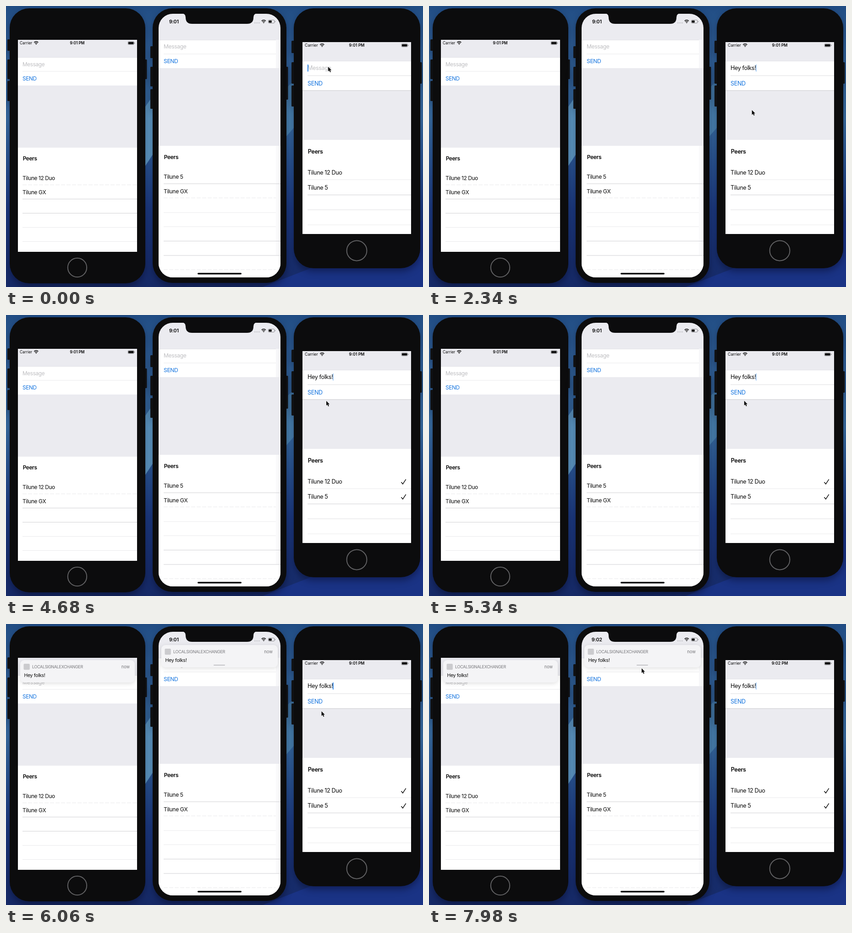
Write an HTML page that moves like this. It is 910 by 615 pixels and loops after 8 s.

```html
<!DOCTYPE html>
<html lang="en">
<head>
<meta charset="utf-8">
<title>Peer messages</title>
<style>
  html, body { margin: 0; width: 100%; height: 100%; overflow: hidden; background: #1d3d82; }
  svg { display: block; width: 910px; height: 615px; }
  text { font-family: Inter, "Liberation Sans", sans-serif; letter-spacing: -.03em; white-space: pre; }
  .body { filter: drop-shadow(0 7px 8px rgba(0, 0, 20, .4)); }
  .banner { filter: drop-shadow(0 2px 5px rgba(0, 0, 0, .13)); }
</style>
</head>
<body>
<svg id="stage" viewBox="0 0 910 615" xmlns="http://www.w3.org/2000/svg"></svg>
<script>
const LOOP = 8000;
const GREY = '#ebebf0', BLUE = '#1273df', FAINT = '#e9e9eb', RULE = '#d0d0d3';
const DEVICE = { pro: 'Tilune 12 Duo', small: 'Tilune GX', eight: 'Tilune 5' };
const APP = 'LOCALSIGNALEXCHANGER';
const MESSAGE = 'Hey folks!';
const KEYS = [780, 840, 900, 960, 1020, 1080, 1320, 1440, 1860, 1980];

const phones = [
  {
    body: [8, 5, 296, 602], screen: [26, 74, 260, 464], corner: 0, size: 11.8,
    left: [[73, 25], [117, 43], [164, 44]], right: [117, 43],
    field: [112, 174], split: 143, list: 310, textX: 36, ruleEnd: 286,
    base: [131.5, 163, 338, 381, 412],
    peers: [DEVICE.pro, DEVICE.small],
    rules: [[391.5, FAINT, 1], [422.5, RULE], [453.5, RULE], [484.5, FAINT], [515.5, FAINT]],
    home: [155.5, 572.5, 20.7]
  },
  {
    body: [320, 5, 292, 601], screen: [333, 17, 266, 577], corner: 31, size: 12.1,
    left: [[88, 26], [133, 43], [182, 43]], right: [133, 72],
    field: [74, 136], split: 105, list: 306, textX: 344, ruleEnd: 589,
    base: [93.3, 125.2, 335, 378, 409.5],
    peers: [DEVICE.eight, DEVICE.small],
    rules: [[389, RULE], [420, FAINT, 1], [452, FAINT], [483, FAINT], [514.5, RULE], [546, RULE], [577, FAINT, 1]]
  },
  {
    body: [628, 5, 276, 569], screen: [647, 79, 237, 420], corner: 0, size: 12.6,
    left: [[76, 27], [123, 47], [174, 46]], right: [123, 47],
    field: [120, 185], split: 152.5, list: 293, textX: 658, ruleEnd: 884,
    base: [140, 173.5, 323.3, 369, 402],
    peers: [DEVICE.pro, DEVICE.eight],
    rules: [[380, FAINT], [413.5, RULE], [446, '#dedee1'], [479, FAINT]],
    home: [765.5, 535.5, 21.9]
  }
];

const rect = (x, y, w, h, fill, r = 0, extra = '') =>
  `<rect x="${x}" y="${y}" width="${w}" height="${h}" rx="${r}" fill="${fill}" ${extra}/>`;
const text = (x, y, size, str, fill = '#080808', extra = '') =>
  `<text x="${x}" y="${y}" font-size="${size}" fill="${fill}" ${extra}>${str}</text>`;
const rule = (x1, x2, y, color, dashed) =>
  `<path d="M${x1} ${y}H${x2}" stroke="${color}" ${dashed ? 'stroke-dasharray="9 3"' : ''}/>`;

const wifi = (x, y) => `<g transform="translate(${x} ${y})" fill="none" stroke="#080808" stroke-width="1.5">
  <path d="M-4.6 -1.3A6.6 6.6 0 0 1 4.6 -1.3M-2.8 .8A4 4 0 0 1 2.8 .8"/>
  <path d="M-1.5 2.2L0 3.8L1.5 2.2Q0 1 -1.5 2.2Z" fill="#080808" stroke="none"/></g>`;

const battery = (x, y, level) =>
  rect(x, y - 3.3, 13.4, 6.8, 'none', 1.8, 'stroke="#77777a" stroke-width=".8"') +
  rect(x + 1, y - 2.3, 11.4 * level, 4.8, '#080808', 1) +
  rect(x + 14.2, y - 1, 1, 2.2, '#77777a', .5);

const statusBar = (x, mid, y, barX, size, id) => `<g id="${id}">` +
  text(x, y + 3, size, 'Carrier', '#080808', 'style="letter-spacing:0"') + wifi(x + 35.8 + (size - 8.3) * 4, y) +
  text(mid, y + 3, size, '', '#080808', 'class="clock" data-suffix=" PM" font-weight="600" text-anchor="middle" style="letter-spacing:0"') +
  battery(barX, y, 1) + '</g>';

// Drawn at its resting place relative to its own top left corner.
const banner = (id, w, scale, grabber) => `<g id="${id}" class="banner">` +
  rect(0, 0, w, 49, '#f4f4f6', 9) +
  rect(7.5, 8, 13.3, 13.3, '#cbcbce', 2) +
  text(26, 18, 8.9 * scale, APP, '#77777b') +
  text(w - 11, 18, 9.2 * scale, 'now', '#77777b', 'text-anchor="end" style="letter-spacing:0"') +
  text(8.4, 37.4, 10.5 * scale, MESSAGE) +
  (grabber ? rect(w / 2 - 13, 43, 25, 2, '#c3c3c7', 1) : '') + '</g>';

function phone(p, i) {
  const [bx, by, bw, bh] = p.body, [sx, sy, sw, sh] = p.screen, [top, bottom] = p.field;
  const whiteEnd = p.corner ? p.ruleEnd : sx + sw;
  const button = (x, [y, h]) => rect(x, y, 8, h, '#101113', 1.5);
  const [msgY, sendY, peersY, ...rowY] = p.base;
  let s = '<g class="body">' + p.left.map(b => button(bx - 5, b)).join('') +
    button(bx + bw - 4.5, p.right) + rect(bx, by, bw, bh, '#0c0c0d', 43) + '</g>';
  s += `<clipPath id="clip${i}">${rect(sx, sy, sw, sh, '#fff', p.corner)}</clipPath><g clip-path="url(#clip${i})">`;
  s += rect(sx, sy, sw, sh, GREY) +
    rect(sx, top, sw, bottom - top, '#f7f7f9') +
    rect(sx, top, whiteEnd - sx, bottom - top, '#fff') +
    rect(sx, p.list, sw, 400, '#fff');
  if (p.corner) s += rect(whiteEnd, p.list, 10, 240, '#fafafb');
  s += rule(sx, whiteEnd, top + .5, '#e2e2e6') + rule(p.textX, p.ruleEnd, p.split, i == 2 ? '#dedee1' : FAINT);
  if (i == 2) s += rule(sx, sx + sw, bottom, '#c9c9cd');
  s += text(p.textX, msgY, p.size, 'Message', '#bfbfc2', `id="hint${i}"`) +
    text(p.textX, sendY, p.size, 'SEND', BLUE) +
    text(p.textX + .7, peersY, p.size, 'Peers', '#080808', 'font-weight="600"') +
    p.peers.map((name, n) => text(p.textX, rowY[n], p.size, name)).join('') +
    p.rules.map(([y, c, dash]) => rule(p.textX, c == RULE ? sx + sw : p.ruleEnd, y, c, dash)).join('');
  if (i == 0) s += statusBar(30, 155.5, 81, 266, 8.3, 'status0') + banner('banner0', 250, 1, false);
  if (i == 1) s += text(366.3, 37.7, 10.8, '', '#080808', 'class="clock" data-suffix="" font-weight="600" text-anchor="middle"') +
    [543, 546.3, 549.6, 552.9].map(x => `<circle cx="${x}" cy="37" r=".8" fill="#8a8a8e"/>`).join('') +
    wifi(562.3, 34) + battery(572.5, 34, .55) + banner('banner1', 254, 1.02, true);
  if (i == 2) s += statusBar(652, 765.5, 86, 863, 8.8, 'status2') +
    text(p.textX, msgY, p.size, '', '#080808', 'id="typed"') +
    rect(0, 128, 1.7, 15.5, '#1478e8', .6, 'id="caret"') +
    [0, 33].map((dy, n) => `<path id="check${n}" d="M862.5 ${365.8 + dy}l3.4 4.2l6.8 -10.4" fill="none" stroke="#080808" stroke-width="1.4"/>`).join('');
  s += '</g>';
  if (i == 1) s += '<path d="M384 16Q392 17 392 25Q392 39 406 39H526Q540 39 540 25Q540 17 548 16Z" fill="#0c0c0d"/>' +
    rect(418, 584, 96, 3.6, '#080808', 1.8);
  if (p.home) s += `<circle cx="${p.home[0]}" cy="${p.home[1]}" r="${p.home[2]}" fill="none" stroke="#616163" stroke-width="2"/>`;
  return s;
}

const stops = [[0, '#214c83'], [.15, '#306199'], [.4, '#3a70a5'], [.56, '#2a5594'], [.72, '#1d3b82'], [1, '#162966']];
const stage = document.getElementById('stage');
stage.innerHTML =
  `<linearGradient id="sky" x2="0" y2="1">${stops.map(([o, c]) => `<stop offset="${o}" stop-color="${c}"/>`).join('')}</linearGradient>` +
  rect(0, 0, 910, 615, 'url(#sky)') +
  '<path d="M296 362L325 318V190L296 232Z" fill="#609cc8"/>' +
  '<path d="M606 292L632 262V160L606 185Z" fill="#4a84b3"/>' +
  '<path d="M560 615L700 560L910 470V615Z" fill="#1a3385"/>' +
  phones.map(phone).join('') +
  '<path id="pointer" d="M0 0V10.3L2.4 8.1L4.1 12L5.9 11.2L4.2 7.4H7.3Z" fill="#080808" stroke="#fff" stroke-width=".9" paint-order="stroke"/>';

const el = id => document.getElementById(id);
const clocks = [...document.querySelectorAll('.clock')];
const show = (id, on) => el(id).setAttribute('visibility', on ? 'visible' : 'hidden');
const move = (id, x, y) => el(id).setAttribute('transform', `translate(${x} ${y})`);
const clamp = v => Math.max(0, Math.min(1, v));
const smooth = v => v * v * (3 - 2 * v);

// time, x, y of the pointer tip
const path = [
  [0, 703, 133], [2100, 703, 133], [2640, 707, 359], [3540, 707, 359], [3900, 705, 392],
  [4320, 705, 392], [4680, 699, 188], [4860, 684, 170], [5160, 684, 170], [5400, 688.5, 191],
  [6060, 688.5, 191], [6720, 722.5, 293], [7320, 722.5, 293], [7680, 444, 188], [7980, 464, 97], [8000, 464, 97]
];

function pointerAt(t) {
  const n = path.findIndex(k => k[0] > t);
  const [t0, x0, y0] = path[n - 1], [t1, x1, y1] = path[n];
  const k = smooth((t - t0) / (t1 - t0));
  return [x0 + (x1 - x0) * k, y0 + (y1 - y0) * k];
}

function caretOpacity(t) {
  if (t < KEYS[0]) return t < 360 ? 1 - clamp((t - 30) / 150) : clamp((t - 330) / 270);
  if (t < 2200) return 1;
  const gap = Math.abs(t % 1000 - 130);
  return .45 + .55 * clamp((140 - gap) / 80);
}

const slide = (t, start, distance) => -distance * (1 - clamp((t - start) / 500)) ** 3;

function draw(t) {
  const typed = KEYS.filter(k => t >= k).length;
  el('typed').textContent = MESSAGE.slice(0, typed);
  show('hint2', !typed);
  const width = typed ? el('typed').getComputedTextLength() : 0;
  el('caret').setAttribute('x', 658 + width - (typed ? .4 : 0));
  el('caret').setAttribute('opacity', caretOpacity(t));

  show('check0', t >= 2760);
  show('check1', t >= 3960);

  const now = t < 6480 ? '9:01' : '9:02';
  for (const c of clocks) c.textContent = now + c.dataset.suffix;

  show('banner0', t >= 5465);
  show('banner1', t >= 5415);
  show('status0', t < 5520);
  move('banner0', 31, 79 + slide(t, 5465, 58));
  move('banner1', 339, 46 + slide(t, 5415, 78));
  move('pointer', ...pointerAt(t));
}

const start = performance.now();
function tick() {
  draw((performance.now() - start) % LOOP);
  requestAnimationFrame(tick);
}
tick();
</script>
</body>
</html>
```
